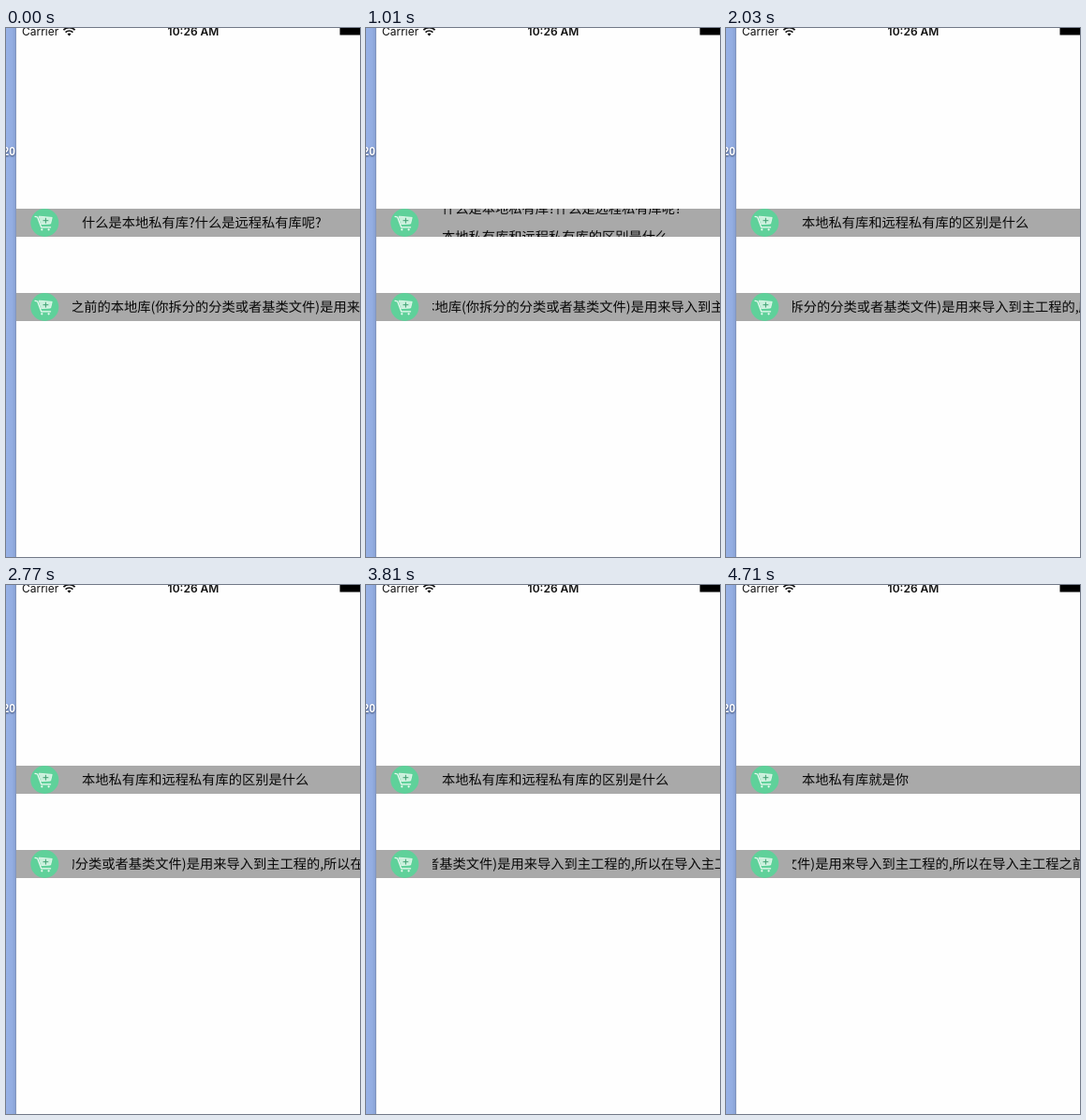
Animation of 378 by 565 pixels, one loop 4.79 s. Source, as an HTML page:

```html
<!DOCTYPE html>
<html lang="zh-CN">
<head>
<meta charset="utf-8">
<title>Text marquee</title>
<style>
  html, body { margin: 0; width: 100%; height: 100%; overflow: hidden; background: #fefefe; }
  svg { display: block; width: 378px; height: 565px; }
  .notice { font: 14.25px "Noto Sans CJK SC", "Noto Sans CJK", sans-serif; fill: #080808; text-rendering: geometricPrecision; }
  .status { font: 12px Inter, sans-serif; fill: #111; }
  .label { font: bold 12px "Liberation Sans", sans-serif; fill: #fff; text-shadow: 0 1px 2px #2c3c60; }
</style>
</head>
<body>
<svg viewBox="0 0 378 565">
  <defs>
    <linearGradient id="desktop">
      <stop offset="0" stop-color="#97b1e6"/>
      <stop offset=".6" stop-color="#93ade1"/>
      <stop offset="1" stop-color="#849dd0"/>
    </linearGradient>
    <clipPath id="topClip"><rect x="71" y="193" width="307" height="30"/></clipPath>
    <clipPath id="bottomClip"><rect x="71" y="283" width="307" height="30"/></clipPath>
    <g id="bar">
      <rect x="11" width="367" height="30" fill="#a9a9a9"/>
      <circle cx="41.3" cy="15" r="15" fill="#5fd19a"/>
      <g fill="none" stroke="#effbf4" stroke-width="1.2" stroke-linecap="round" stroke-linejoin="round">
        <path d="M31 8.3l2.6.7 4 10.8h10"/>
        <path d="M35.6 8.2l13.6 1.2-1.6 6.6-9.6.6z" fill="#c9f0dc" stroke-width=".8"/>
        <path d="M42.4 10.2v5M39.9 12.7h5" stroke="#3f9f72" stroke-width="1"/>
      </g>
      <g fill="#effbf4"><circle cx="38.3" cy="22.3" r="1.1"/><circle cx="45.6" cy="22.3" r="1.1"/></g>
    </g>
  </defs>

  <rect width="378" height="565" fill="#fefefe"/>
  <rect width="11" height="565" fill="url(#desktop)"/>
  <rect x="10" width="1" height="565" fill="#8497bd"/>
  <text class="label" x="9.8" y="136" text-anchor="end">20</text>

  <text class="status" x="17" y="8">Carrier</text>
  <text class="status" x="200" y="8" text-anchor="middle" font-weight="600" style="font-weight:600">10:26 AM</text>
  <g fill="none" stroke="#111" stroke-width="1.7">
    <path d="M61.4 2.2a8.6 8.6 0 0 1 12.2 0M63.6 4.6a5.5 5.5 0 0 1 7.8 0"/>
    <path d="M67.5 8.4l-2-2a2.8 2.8 0 0 1 4 0z" fill="#111" stroke="none"/>
  </g>
  <rect x="356.5" width="21.5" height="7.5"/>

  <use href="#bar" y="193"/>
  <use href="#bar" y="283"/>
  <g class="notice" clip-path="url(#topClip)">
    <g id="pager">
      <text x="81" y="213">什么是本地私有库?什么是远程私有库呢?</text>
      <text x="81" y="243">本地私有库和远程私有库的区别是什么</text>
      <text x="81" y="273">本地私有库就是你</text>
    </g>
  </g>
  <g class="notice" clip-path="url(#bottomClip)">
    <text id="marquee" y="303">之前的本地库(你拆分的分类或者基类文件)是用来导入到主工程的,所以在导入主工程之前</text>
  </g>
</svg>
<script>
  const LOOP = 4790, LINE = 30, STEP_PX = 7.5, START_X = 69;
  const pager = document.getElementById("pager");
  const marquee = document.getElementById("marquee");

  // Each step holds for 140 or 150 ms.
  const stepLength = i => i < 16 ? (i % 2 ? 150 : 140) : i === 21 ? 140 : 150;

  function stepAt(time) {
    let step = 0;
    for (let end = stepLength(0); time >= end; end += stepLength(step)) step++;
    return step;
  }

  // Eased page turn lasting two steps.
  function turn(step, start) {
    const p = Math.min(1, Math.max(0, (step - start) / 2));
    return p * p * (3 - 2 * p);
  }

  function draw() {
    const step = stepAt(performance.now() % LOOP);
    marquee.setAttribute("x", START_X - STEP_PX * step);
    const page = turn(step, 6) + turn(step, 26);
    pager.setAttribute("transform", `translate(0 ${-LINE * page})`);
    requestAnimationFrame(draw);
  }
  draw();
</script>
</body>
</html>
```
